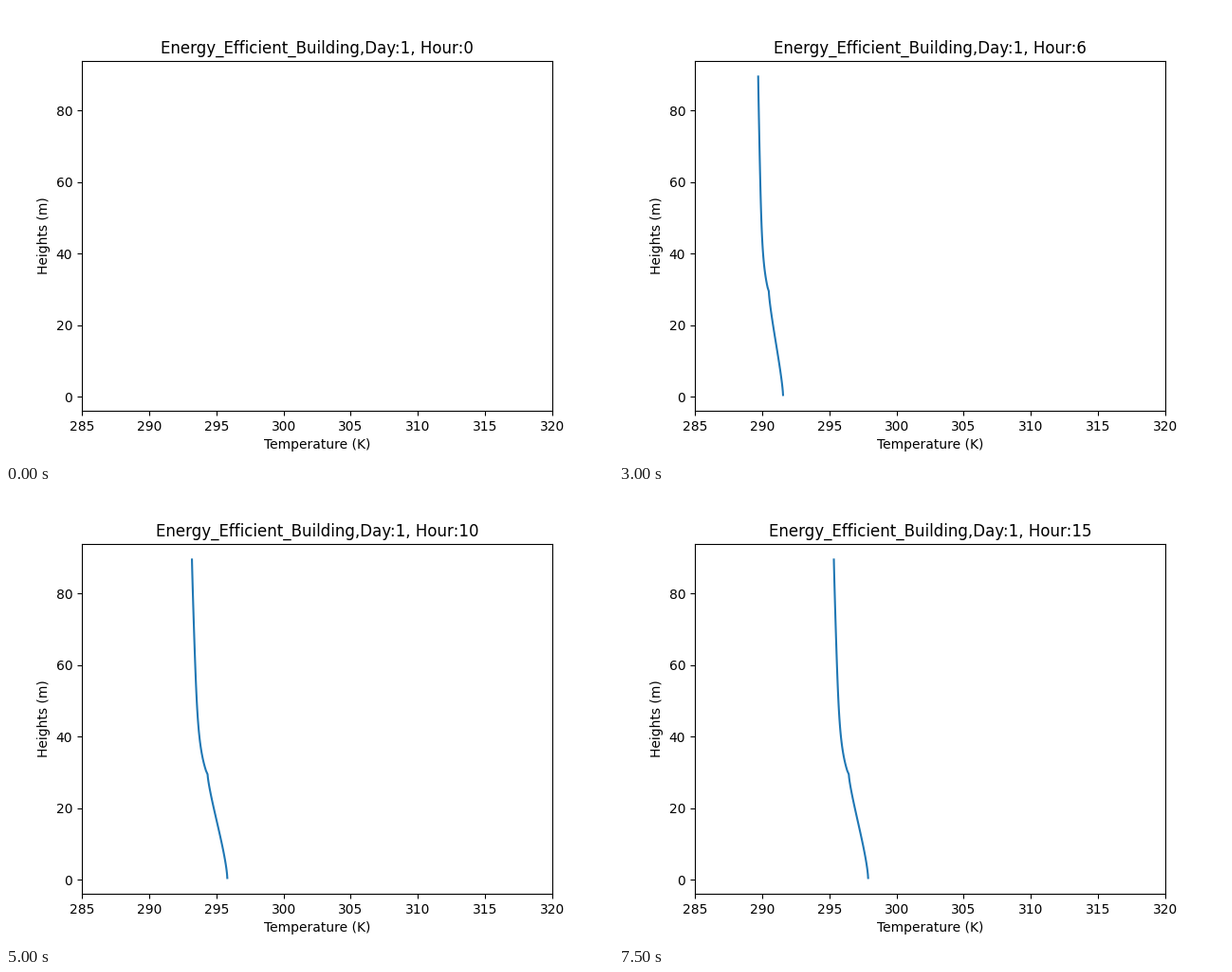
A matplotlib script for the animation above (8 s loop, 640 px wide and 480 px high).

```python
import numpy as np
import matplotlib.pyplot as plt
from matplotlib.animation import FuncAnimation

HOURS = 16
STEP_MS = 500
ROOF_IN, ROOF_OUT = 29.5, 30.5

# Key temperatures (K) through the day
KEY_HOURS = [1, 4, 6, 8, 10, 13, 15]
TOP = [291.32, 289.18, 289.71, 291.60, 293.19, 295.02, 295.34]
ROOF = [293.80, 290.54, 290.50, 293.33, 294.35, 297.70, 296.45]
GROUND = [299.25, 293.42, 291.56, 294.55, 295.82, 299.23, 297.89]

z = np.arange(0.5, 90.0, 1.0)


def temperature(hour):
    """Temperature at each height; the run starts with an empty field."""
    if hour == 0:
        return np.full_like(z, np.nan)
    top, inside, ground = (np.interp(hour, KEY_HOURS, key)
                           for key in (TOP, ROOF, GROUND))
    stored = ground - inside
    outside = inside - 0.08 * stored    # drop across the roof

    # open air: gentle trend plus a warm layer that fades above the roof
    u = (z[-1] - z) / (z[-1] - ROOF_OUT)
    trend = np.clip(u, 0, 1) ** 1.1
    warm = np.exp(-np.clip(z - ROOF_OUT, 0, None) / 7)
    share = 0.4 + 0.08 * (outside - top)
    above = top + (outside - top) * (share * trend + (1 - share) * warm)

    # indoors: S-shaped, flatter near the ground the more heat is stored
    v = np.clip((ROOF_IN - z) / (ROOF_IN - z[0]), 0, 1)
    below = inside + stored * (1 - (1 - v**1.3) ** (1.1 + 0.22 * stored))
    return np.where(z > 30, above, below)


fig, ax = plt.subplots(figsize=(6.4, 4.8), dpi=100)
line, = ax.plot([], [], color="tab:blue", lw=1.5)
ax.set_xlim(285, 320)
ax.set_ylim(-3.95, 93.95)
ax.set_xlabel("Temperature (K)")
ax.set_ylabel("Heights (m)")
title = ax.set_title("")


def draw(hour):
    line.set_data(temperature(hour), z)
    title.set_text(f"Energy_Efficient_Building,Day:1, Hour:{hour}")
    return line, title


anim = FuncAnimation(fig, draw, frames=HOURS, interval=STEP_MS,
                     repeat=True, repeat_delay=0, blit=False)
plt.show()
```
